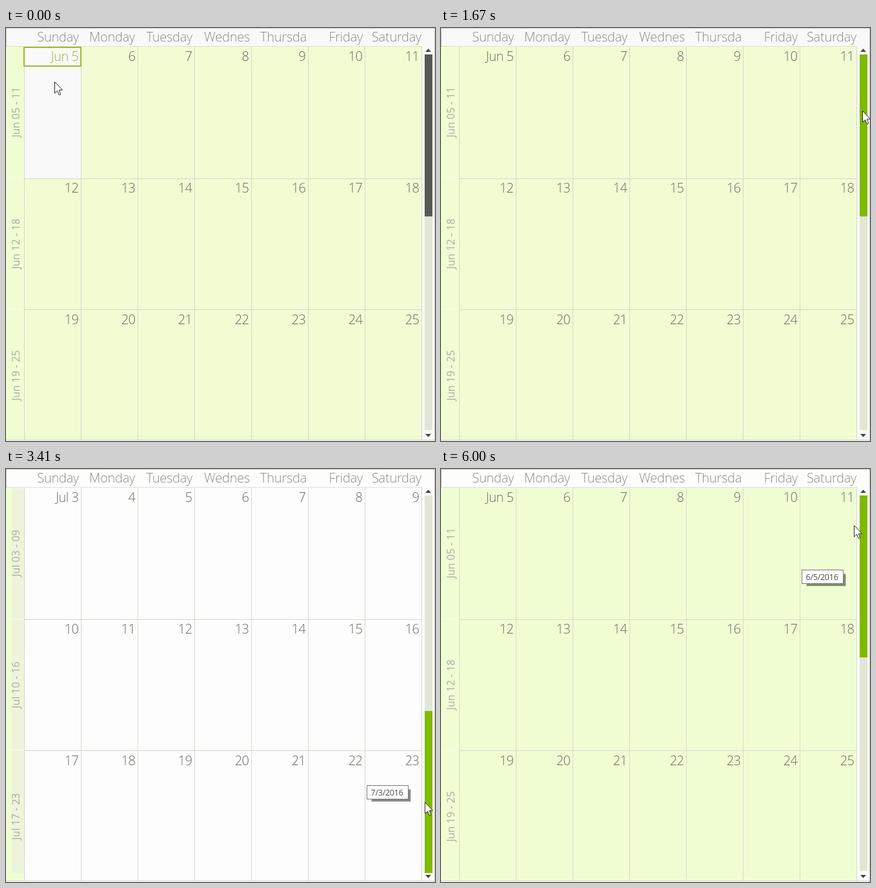
Write an HTML page that moves like this. It is 665 px wide and 640 px high and loops after 6.09 s.

```html
<!DOCTYPE html>
<html lang="en">
<head>
<meta charset="utf-8">
<title>Month calendar</title>
<style>
  html, body { margin: 0; width: 100%; height: 100%; overflow: hidden; background: #fdfdfd; }
  svg { display: block; width: 665px; height: 640px; font-family: "Open Sans", "Noto Sans", sans-serif; }
  .day { font-size: 20px; font-weight: 300; letter-spacing: -.5px; text-anchor: end; }
  .head { font-size: 20px; font-weight: 300; letter-spacing: -.25px; text-anchor: end; fill: #8b8b8b; }
  .week { font-size: 16px; text-anchor: middle; fill: #a8aca2; }
  .tip { font-size: 12.5px; letter-spacing: -.25px; fill: #4c4c4c; }
</style>
</head>
<body>
<svg id="stage" viewBox="0 0 665 640"></svg>
<script>
const LOOP = 6090;
const COL = 88, LEFT = 28;
const ROWS = [29, 233, 437, 638];
const HEADS = [["Sunday", 113], ["Monday", 200], ["Tuesday", 289], ["Wednes", 378],
               ["Thursda", 466], ["Friday", 553], ["Saturday", 644]];

// Each step changes only the listed values; the rest carry over.
// week: first visible week, at: pointer, col: hovered day, tip: [week in text, slot]
const STEPS = [
  { t: 0, week: 0, at: [75, 83], col: 0, tip: null, thumb: "#575a53", pressed: false, strip: false },
  { t: 250, at: [160, 80], col: 1 },
  { t: 370, at: [250, 74], col: 2 },
  { t: 490, at: [338, 68], col: 3 },
  { t: 610, at: [430, 63], col: 4 },
  { t: 760, at: [594, 59], col: 6 },
  { t: 880, at: [626, 62] },
  { t: 1000, at: [641, 68] },
  { t: 1150, at: null, col: -1 },
  { t: 1550, at: [655, 138], thumb: "#7fb900" },
  { t: 1670, at: [653, 128] },
  { t: 1790, at: [652, 120] },
  { t: 1940, at: [652, 122], pressed: true, tip: [0, 0] },
  { t: 2060, at: [651, 136] },
  { t: 2340, at: [639, 196], week: 1, tip: [1, 1] },
  { t: 2590, at: [638, 254], week: 2, tip: [2, 2] },
  { t: 2740, at: [638, 306], week: 3, tip: [3, 3] },
  { t: 2890, at: [642, 391], week: 4, tip: [3, 4], strip: true },
  { t: 3140, at: [645, 434], tip: [4, 4] },
  { t: 3260, at: [647, 472] },
  { t: 3410, at: [649, 516] },
  { t: 4940, at: [653, 493] },
  { t: 5060, at: null },
  { t: 5310, week: 2, tip: [2, 3], strip: false },
  { t: 5460, at: [652, 190], week: 1, tip: [1, 1] },
  { t: 5610, at: [645, 138], week: 0, tip: [0, 0] },
  { t: 5730, at: [639, 108] },
  { t: 5850, at: [637, 91] },
  { t: 6000, at: [640, 87] }
];

const rect = (x, y, w, h, fill, more = "") =>
  `<rect x="${x}" y="${y}" width="${w}" height="${h}" fill="${fill}" ${more}/>`;
const text = (x, y, cls, str, more = "") =>
  `<text x="${x}" y="${y}" class="${cls}" ${more}>${str}</text>`;
const path = (d, fill, more = "") => `<path d="${d}" fill="${fill}" ${more}/>`;

// Days are counted from the first of June.
function dateOf(n) {
  return n > 30 ? { name: "Jul", month: 7, day: n - 30 } : { name: "Jun", month: 6, day: n };
}
const firstDay = week => 5 + 7 * week;
const thumbTop = week => Math.floor(41 + 83.5 * week);
const pad = n => String(n).padStart(2, "0");

function drawCell(s, row, col, look) {
  const date = dateOf(firstDay(s.week + row) + col);
  const x = LEFT + COL * col, y = ROWS[row], h = ROWS[row + 1] - y;
  const hot = row === 0 && s.col === col;
  const fill = hot ? (col ? "#f1f3f3" : "#f9f9f9") : date.month === 6 ? look.green : look.back;
  const ink = hot ? (col ? "#b6c67a" : "#9ab42f") : "#666a62";
  const named = (row === 0 && col === 0) || date.day === 1;
  return rect(x, y, COL, h, fill) +
    text(x + 84.5, y + 22, "day", (named ? date.name + " " : "") + date.day, `fill="${ink}"`);
}

function drawWeek(week, row) {
  const a = dateOf(firstDay(week)), b = dateOf(firstDay(week) + 6);
  const y = ROWS[row] + 101.5;
  return text(21, y, "week", `${a.name} ${pad(a.day)} - ${pad(b.day)}`, `transform="rotate(-90 21 ${y})"`);
}

function drawGrid(s, look) {
  let out = rect(0, 29, LEFT, 610, look.green);
  if (s.strip) out += rect(9, 30, 19, 596, "#eef4dc");
  for (let r = 0; r < 3; r++) {
    for (let c = 0; c < 7; c++) out += drawCell(s, r, c, look);
    out += drawWeek(s.week + r, r);
  }
  for (let c = 0; c < 8; c++) out += rect(LEFT + COL * c, 29, 1, 610, look.line);
  out += rect(0, 28, 645, 1, "#dfe1d5");
  for (const y of [233, 436]) out += rect(0, y - 1, LEFT, 1, "#f8fbed") + rect(LEFT, y, 617, 1, look.line);
  return out + rect(0, 638, 665, 1, "#cfd1c6");
}

function drawBar(s) {
  return rect(649, 41, 12, 582, "#e2e6d6") +
    rect(649, thumbTop(s.week), 12, 251, s.thumb) +
    path("M650 37L654.5 32L659 37Z", "#484848") +
    path("M650 629L659 629L654.5 634Z", "#484848");
}

function drawHover(col) {
  const x = col ? LEFT + COL * col : 27;
  const w = LEFT + COL * (col + 1) + 1 - x;
  return rect(x + 1, 30, w - 2, 29, "none", 'stroke="#9fbc2f" stroke-width="2"');
}

function drawTip([week, slot]) {
  const date = dateOf(firstDay(week));
  const label = `${date.month}/${date.day}/2016`;
  const w = label.length > 8 ? 71 : 64, y = thumbTop(slot) + 115;
  return rect(566, y + 6, w - 2, 20, "#000", 'opacity=".16"') +
    rect(567, y + 7, w - 4, 18, "#000", 'opacity=".36"') +
    rect(559.5, y + 0.5, w, 21, "#fdfdfd", 'stroke="#787878"') +
    text(565.5, y + 15.5, "tip", label);
}

function drawPointer([x, y]) {
  return path("M.5 .5V18L4.5 14.3L7.3 20.8L9.8 19.8L7.2 13.3L12.6 13.1Z", "#fff",
    `stroke="#262626" transform="translate(${x} ${y})"`);
}

function draw(s) {
  const look = s.pressed
    ? { back: "#fdfdfd", green: "#f0fdd3", line: "#d8dacb", edge: "#cdc6ac" }
    : { back: "#f9f9f9", green: "#f1fcd3", line: "#d4d8ca", edge: "#c9cbb4" };
  let out = rect(0, 0, 665, 640, look.back);
  for (const [name, x] of HEADS) out += text(x, 21, "head", name);
  out += drawGrid(s, look) + drawBar(s);
  out += rect(0, 0, 665, 1, look.edge) + rect(0, 0, 1, 29, look.edge) + rect(664, 0, 1, 640, look.edge);
  if (s.col >= 0) out += drawHover(s.col);
  if (s.tip) out += drawTip(s.tip);
  if (s.at) out += drawPointer(s.at);
  return out;
}

const stage = document.getElementById("stage");
const start = performance.now();
let shown = -1;

function frame() {
  const t = (performance.now() - start) % LOOP;
  const past = STEPS.filter(step => step.t <= t);
  if (past.length !== shown) {
    shown = past.length;
    stage.innerHTML = draw(Object.assign({}, ...past));
  }
  requestAnimationFrame(frame);
}
frame();
</script>
</body>
</html>
```
